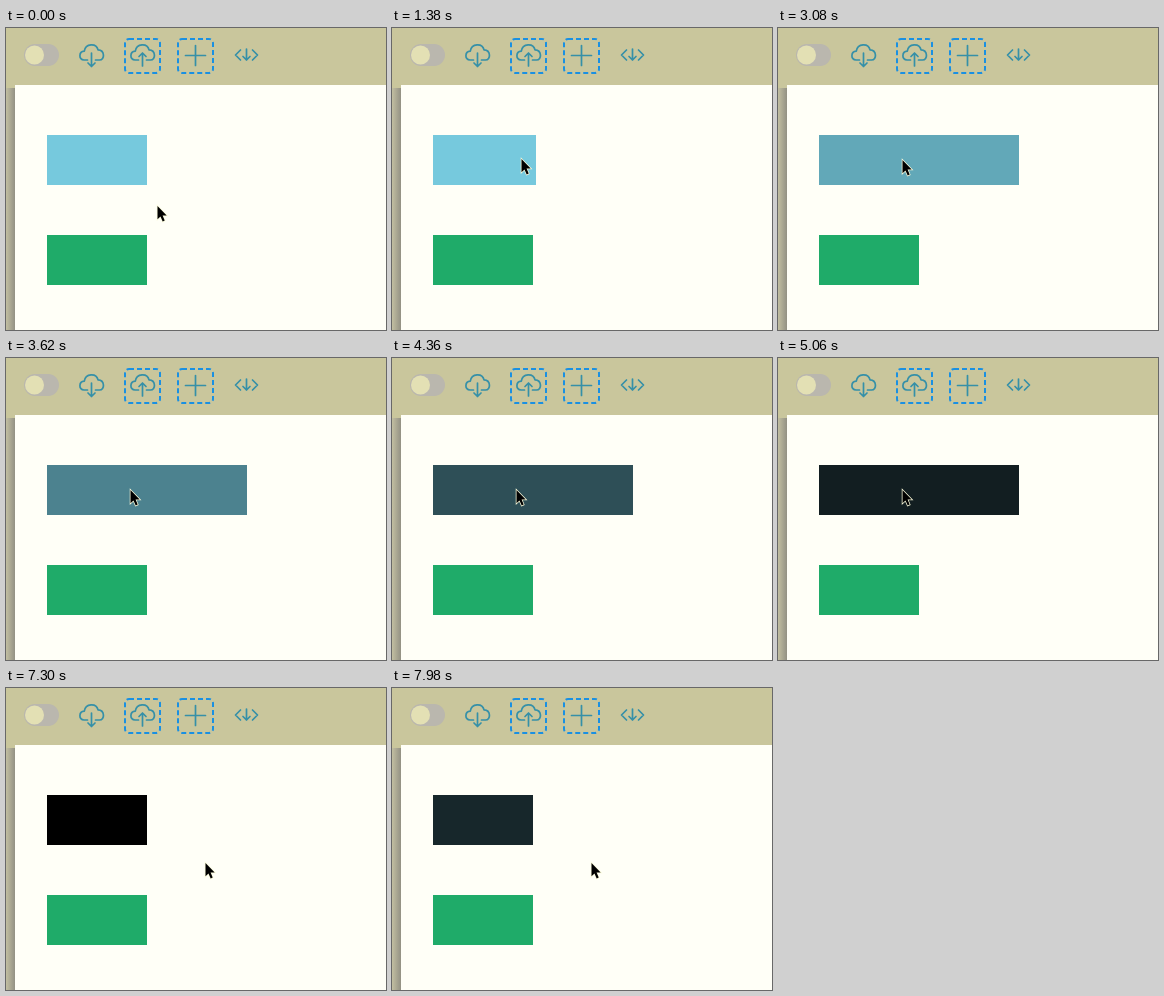
Recreate the animation shown at these times as an HTML page with a canvas. Size 380 px wide and 302 px high, loop 8 s.

```html
<!DOCTYPE html>
<html lang="en">
<head>
<meta charset="utf-8">
<title>Hover transition</title>
<style>
html, body { margin: 0; width: 100%; height: 100%; overflow: hidden; background: #fffff7; }
canvas { display: block; width: 380px; height: 302px; }
</style>
</head>
<body>
<canvas id="stage" width="380" height="302"></canvas>
<script>
const ctx = document.getElementById('stage').getContext('2d');
const LOOP = 8000;
const GROW = 990, FADE = 2900;
const TEAL = '#3590a8', BLUE = '#1a90e2';
const SKY = [118, 201, 221];

const mix = (a, b, p) => a + (b - a) * p;
const smooth = p => p * p * (3 - 2 * p);
const progress = (t, start, length) => Math.min(1, Math.max(0, (t - start) / length));

// The box widens on hover, then darkens; both run back after the pointer leaves.
const boxWidth = t => 100 + 100 * (progress(t, 1350, GROW) - progress(t, 5740, GROW));
const boxLight = t => 1 - progress(t, 2600, FADE) + progress(t, 7420, FADE);

function pointerAt(t) {
  let x = 151, y = 178;
  const move = (toX, toY, start, length) => {
    const p = smooth(progress(t, start, length));
    x = mix(x, toX, p);
    y = mix(y, toY, p);
  };
  move(114, 98, 1000, 680);
  move(124, 132, 1680, 420);
  move(197, 173, 5520, 560);
  move(199, 175, 6700, 160);
  return [Math.round(x), Math.round(y)];
}

function rect(color, x, y, w, h) {
  ctx.fillStyle = color;
  ctx.fillRect(x, y, w, h);
}

function stroke(d) {
  ctx.strokeStyle = TEAL;
  ctx.lineWidth = 1.7;
  ctx.lineCap = ctx.lineJoin = 'round';
  ctx.stroke(new Path2D(d));
}

function at(x, y, draw) {
  ctx.save();
  ctx.translate(x, y);
  draw();
  ctx.restore();
}

function cloud(x, arrow) {
  at(x, 27, () => {
    stroke('M-4 5H-7.5C-13 5-13-3.5-7.2-3.8C-6-12 5-12 6.5-5.2C13.5-5 13.5 5 8 5H4');
    stroke(arrow);
  });
}

function dashedBox(x) {
  ctx.save();
  ctx.setLineDash([5, 3]);
  ctx.lineCap = 'butt';
  ctx.strokeStyle = BLUE;
  ctx.lineWidth = 2;
  ctx.beginPath();
  ctx.roundRect(x, 11, 35, 34, 4);
  ctx.stroke();
  ctx.restore();
}

function toggle() {
  ctx.fillStyle = '#bab7ae';
  ctx.beginPath();
  ctx.roundRect(18, 16, 35, 22, 11);
  ctx.fill();
  ctx.fillStyle = '#e3e0b4';
  ctx.beginPath();
  ctx.arc(28.5, 27, 9.5, 0, Math.PI * 2);
  ctx.fill();
}

function toolbar() {
  rect('#c9c69c', 0, 0, 380, 302);
  toggle();
  cloud(85.5, 'M0-2V11.5M-3.5 8L0 11.5L3.5 8');
  dashedBox(119);
  cloud(136.5, 'M0 11V-2M-3.5 1.5L0-2L3.5 1.5');
  dashedBox(172);
  at(189.5, 27.5, () => stroke('M-10 0H10M0-10V10'));
  at(240.5, 27, () =>
    stroke('M-6-5L-11 0L-6 5M6-5L11 0L6 5M0-6V5M-3.5 1.5L0 5L3.5 1.5'));
}

function page() {
  const shade = ctx.createLinearGradient(0, 0, 9, 0);
  shade.addColorStop(0, '#c2bfa1');
  shade.addColorStop(1, '#939184');
  rect(shade, 0, 60, 9, 242);
  rect('#fffff7', 9, 57, 371, 245);
  rect('#1fab69', 41, 207, 100, 50);
}

function cursor(x, y) {
  at(x + 0.5, y, () => {
    const arrow = new Path2D('M0 0V13.2L3 10.4L5.2 15.4L7.2 14.5L5.1 9.6H9.2Z');
    ctx.lineJoin = 'miter';
    ctx.lineWidth = 1.5;
    ctx.strokeStyle = '#fbfbdc';
    ctx.stroke(arrow);
    ctx.fillStyle = '#000';
    ctx.fill(arrow);
  });
}

function frame(now) {
  const t = now % LOOP;
  const rgb = SKY.map(c => Math.round(c * boxLight(t)));
  toolbar();
  page();
  rect(`rgb(${rgb})`, 41, 107, Math.round(boxWidth(t)), 50);
  cursor(...pointerAt(t));
}

const start = performance.now();
function tick() {
  frame(performance.now() - start);
  requestAnimationFrame(tick);
}
tick();
</script>
</body>
</html>
```
